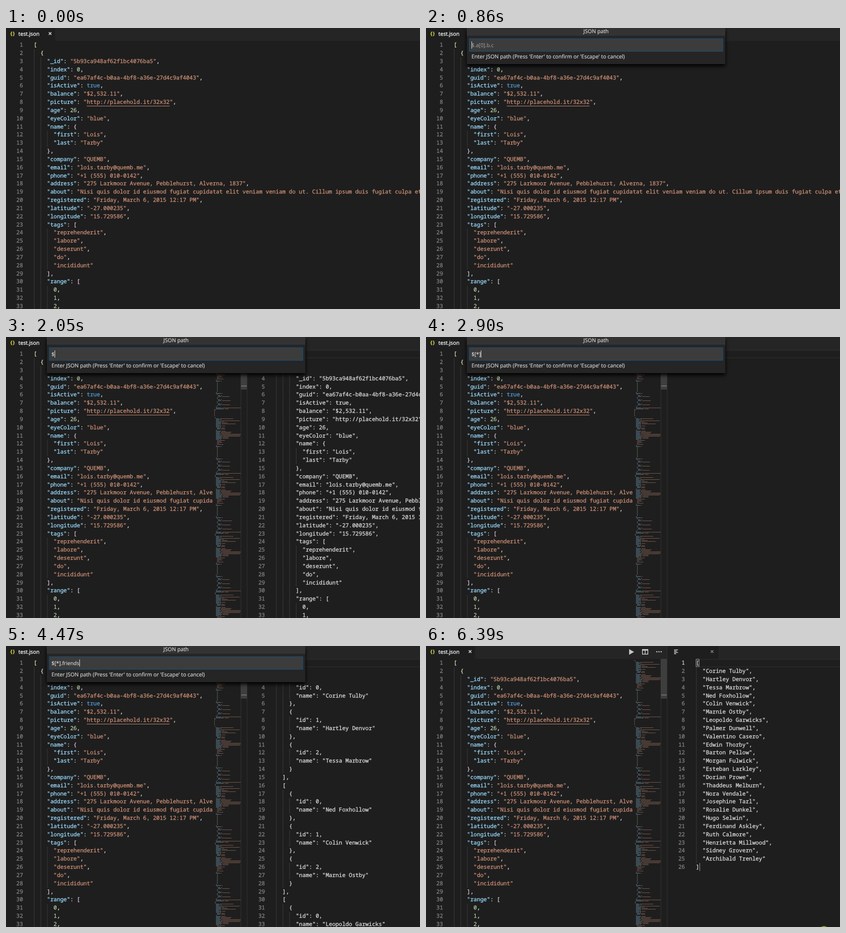
Recreate the animation shown at these times as an HTML page. Size 801 by 545 pixels, loop 6450 ms.

```html
<!DOCTYPE html>
<html lang="en">
<head>
<meta charset="utf-8">
<title>JSON path extraction</title>
<style>
  html, body { margin: 0; width: 100%; height: 100%; overflow: hidden; background: #1e1e1e; }
  body { position: relative; text-rendering: geometricPrecision; }
  svg { position: absolute; left: 0; top: 0; display: block; }
  .code { font: 10.69px "Noto Sans Mono", "DejaVu Sans Mono", monospace; color: #dedede; }
  .code text, .code tspan, .ui text { fill: currentColor; stroke: currentColor; stroke-width: .28; }
  .code .num { color: #858585; text-anchor: end; }
  .guide { stroke: #404040; stroke-width: .85; fill: none; }
  .ui, .box { font: 10.3px "Open Sans", "Noto Sans", sans-serif; }
  .box { position: absolute; left: 79px; top: 0; width: 500px; background: #252526; color: #d8d8d8;
    box-shadow: 0 4px 7px #000; white-space: nowrap; -webkit-text-stroke: .18px currentColor; }
  .input { position: absolute; left: 4px; width: 486px; height: 24px; padding-left: 4px; background: #3c3c3c;
    border: 1px solid #0f4c75; font-size: 10.1px; line-height: 24px; }
  .caret { display: inline-block; width: 1px; height: 14px; margin-right: -1px; vertical-align: -3px; background: #d8d8d8; }
  .row { position: absolute; left: 0; right: 0; height: 18.33px; line-height: 18.33px; padding: 0 15px 0 9px;
    display: flex; align-items: center; }
  .row.on { background: #062f4a; color: #fff; }
  .row.cut { border-top: 1px solid #3f3f46; margin-top: -1px; }
  .label { flex: 1; }
  .tag { color: #0e93ee; margin-left: 8px; }
  .key { font-size: 8.75px; line-height: 12px; min-width: 6px; padding: 0 3px; text-align: center;
    background: #353536; border: 1px solid #333; border-bottom-color: #444; border-radius: 2.5px; }
  .plus { font-size: 8.75px; margin: 0 2px; }
  .gap { width: 4px; }
  #title { height: 15px; line-height: 15px; background: #333334; text-align: center; }
  #hint { position: absolute; left: 9px; top: 47px; line-height: 18px; }
  #holder { color: #959595; }
</style>
</head>
<body>
<svg width="801" height="545" viewBox="0 0 801 545">
  <defs><clipPath id="pane"><rect id="paneRect" width="801" height="545"/></clipPath></defs>
  <rect width="801" height="545" fill="#1e1e1e"/>
  <rect x="95" width="706" height="25" fill="#252526"/>
  <g class="ui">
    <text x="8.5" y="14" font-size="9.5" font-weight="700" letter-spacing="1" color="#cbcb41">{}</text>
    <text x="24" y="14.8" color="#fff">test.json</text>
    <path d="M82.8 8.3l5 5m0-5l-5 5" stroke="#e0e0e0" stroke-width="1.5"/>
  </g>
  <g id="main" class="code" clip-path="url(#pane)"></g>
  <g id="split">
    <g id="minimap" fill="none" stroke-width="1" stroke-dasharray="1.2 .7"></g>
    <rect x="454" y="25" width="347" height="520" fill="#1e1e1e"/>
    <path d="M454.5 25V545" stroke="#303030"/>
    <rect x="454" y="25" width="12" height="77" fill="#3e3e3e"/>
    <path d="M455 95H466" stroke="#8c8c8c" stroke-width="1.1"/>
    <path d="M466.5 0V545" stroke="#303030"/>
    <rect x="467" width="99" height="25" fill="#1e1e1e"/>
    <g fill="#c5c5c5">
      <path d="M393 6l9.5 5.5l-9.5 5.5z"/>
      <path d="M418 6h12v10.5h-12zm1.5 3v6h3.8v-6zm5.3 0v6h3.7v-6z" fill-rule="evenodd"/>
      <path d="M445.5 10h2.2v2.2h-2.2zm4.2 0h2.2v2.2h-2.2zm4.2 0h2.2v2.2h-2.2z"/>
    </g>
    <path d="M480 7.5h7.5M480 10h5M480 12.5h7.5M480 15h4" stroke="#c5c5c5" stroke-width="1.3"/>
    <path d="M551 8.3l5 5m0-5l-5 5" stroke="#8a8a8a" stroke-width="1.3"/>
    <path d="M522 25.8H801M522 40.4H801" stroke="#2b2b2b" stroke-width="1.4"/>
    <g id="output" class="code"></g>
    <circle id="pointer" cx="770" cy="553" r="10" fill="#8d8a1c"/>
  </g>
</svg>

<div class="box" id="commands" style="height:288px">
  <div class="input" style="top:-3px">&gt;<span class="caret"></span></div>
</div>
<div class="box" id="prompt" style="height:70px">
  <div id="title">JSON path</div>
  <div class="input" style="top:20px"><span id="typed"></span><span class="caret" id="caret"></span><span id="holder">$.a[0].b.c</span></div>
  <div id="hint">Enter JSON path (Press 'Enter' to confirm or 'Escape' to cancel)</div>
</div>

<script>
const $ = id => document.getElementById(id);
const LOOP = 6450, CHAR = 6.414, LINE = 15.833, TOP = 25, ROWS = 33;

// Document and query results
const people = ['Corine Tulby', 'Hartley Denvor', 'Tessa Marbrow', 'Ned Foxhollow', 'Colin Venwick', 'Marnie Ostby',
  'Leopoldo Garwicks', 'Palmer Dunwell', 'Valentino Casero', 'Edwin Thorby', 'Barton Pellow', 'Morgan Fulwick',
  'Esteban Larkley', 'Dorian Prowe', 'Thaddeus Melburn', 'Nora Vendale', 'Josephine Tarl', 'Rosalie Dunkel',
  'Hugo Selwin', 'Ferdinand Askley', 'Ruth Calmore', 'Henrietta Millwood', 'Sidney Grovern', 'Archibald Trenley'];
const record = index => ({
  _id: '5b93ca948af62f1bc4076ba5',
  index,
  guid: 'ea67af4c-b0aa-4bf8-a36e-27d4c9af4043',
  isActive: true,
  balance: '$2,532.11',
  picture: 'http://placehold.it/32x32',
  age: 26,
  eyeColor: 'blue',
  name: { first: 'Lois', last: 'Tarby' },
  company: 'QUEMB',
  email: 'lois.tarby@quemb.me',
  phone: '+1 (555) 010-0142',
  address: '275 Larkmoor Avenue, Pebblehurst, Alverna, 1837',
  about: 'Nisi quis dolor id eiusmod fugiat cupidatat elit veniam veniam do ut. Cillum ipsum duis fugiat culpa et labore.',
  registered: 'Friday, March 6, 2015 12:17 PM',
  latitude: '-27.000235',
  longitude: '15.729586',
  tags: ['reprehenderit', 'labore', 'deserunt', 'do', 'incididunt'],
  range: [...Array(10).keys()],
  friends: people.slice(index * 3, index * 3 + 3).map((name, id) => ({ id, name })),
  greeting: 'Hello, Lois! You have 9 unread messages.',
  favoriteFruit: 'apple'
});
const data = [...Array(8).keys()].map(record);
const toLines = value => JSON.stringify(value, null, 2).split('\n');
const indentOf = line => line.search(/\S/);
const TOKEN = /"[^"]*"|true|\d+|[[\]{}]/g;

function colour(tok, next, indent) {
  if (tok[0] === '"') return next === ':' ? '#9cdcfe' : '#ce9178';
  if (tok === 'true') return '#569cd6';
  if (/\d/.test(tok)) return '#b5cea8';
  return indent < 4 ? '#ece3b8' : '#e0c8e0';
}

function paint(line) {
  const indent = indentOf(line);
  return line.trim().replace(TOKEN, (tok, at, all) =>
    `<tspan color="${colour(tok, all[at + tok.length], indent)}">${tok}</tspan>`);
}

const baseline = i => TOP + 11.2 + i * LINE;

function codeBlock(lines, x, format) {
  let guides = '', text = '';
  lines.slice(0, ROWS).forEach((line, i) => {
    const indent = indentOf(line);
    for (let k = 0; k < indent; k += 2) guides += `M${x + k * CHAR + .9} ${TOP + i * LINE}v${LINE}`;
    text += `<text x="${x + indent * CHAR}" y="${baseline(i)}">${format(line)}</text>`;
  });
  return `<path class="guide" d="${guides}"/>${text}`;
}

const numbers = (count, x) => [...Array(Math.min(count, ROWS)).keys()]
  .map(i => `<text class="num" x="${x}" y="${baseline(i)}">${i + 1}</text>`).join('');

const source = toLines(data);
$('main').innerHTML = numbers(ROWS, 32.8) + codeBlock(source, 53.6, paint) +
  `<path d="M156.2 151.4h${25 * CHAR}" stroke="#ce9178" stroke-width=".9"/>`;

// Minimap: one dashed stroke per token, grouped by colour
const strokes = {};
source.slice(0, 255).forEach((line, i) => {
  const y = 27.5 + i * 2 + (i > 57 ? 13 : 0);
  for (const m of line.matchAll(TOKEN)) {
    const x = 402.5 + m.index, c = colour(m[0], line[m.index + m[0].length], 4);
    if (x < 454) strokes[c] = (strokes[c] || '') + `M${x} ${y}H${Math.min(454, x + m[0].length)}`;
  }
});
$('minimap').innerHTML = Object.entries(strokes)
  .map(([c, d]) => `<path d="${d}" stroke="${c}" opacity=".75"/>`).join('') +
  '<path d="M403.5 140V154" stroke="#ce9178" opacity=".6"/>';

// Results: value, shown from, line numbers from, cleared at
const results = [
  [[data], 1880, 2050, 2210],
  [data, 2980, 3130, 3370],
  [data.map(d => d.friends), 4310, 4470, 4710],
  [people, 5400, 5550, LOOP]
].map(([value, from, numbered, to]) => {
  const lines = toLines(value), X = 522.2;
  const body = document.createElementNS('http://www.w3.org/2000/svg', 'g');
  const nums = body.cloneNode();
  body.innerHTML = codeBlock(lines, X, line => line.trim());
  nums.innerHTML = numbers(lines.length, 501);
  if (value === people) {
    body.innerHTML += '<path d="M522.5 25.5h6v14.5h-6zM529.7 421v15.5" fill="none" stroke="#999"/>';
    nums.firstChild.style.color = '#d0d0d0';
  }
  $('output').append(body, nums);
  return { body, nums, from, numbered, to };
});

// Command list
const commands = ['jsonpath: Extract JSON data||recently used', 'TSLint: Fix all auto-fixable problems',
  'Format Document|Shift Alt F', 'Run Code|Ctrl Alt N', 'Tasks: Run Build Task|Ctrl Shift B',
  'Python: Select Interpreter', 'Add Cursor Above|Ctrl Alt UpArrow|other commands',
  'Add Cursor Below|Ctrl Alt DownArrow', 'Add Cursors to Line Ends|Shift Alt I',
  'Add Line Comment|Ctrl K,Ctrl C', 'Add Selection To Next Find Match|Ctrl D',
  'Add Selection To Previous Find Match', 'Back|Alt LeftArrow', 'Change All Occurrences|Ctrl F2'];
const chord = keys => keys.split(' ').map(k => `<span class="key">${k}</span>`).join('<span class="plus">+</span>');
$('commands').innerHTML += commands.map((item, i) => {
  const [label, keys, tag] = item.split('|');
  return `<div class="row${i === 0 ? ' on' : i === 6 ? ' cut' : ''}" style="top:${27 + i * 18.33}px">` +
    `<span class="label">${label}</span>` +
    (keys ? keys.split(',').map(chord).join('<span class="gap"></span>') : '') +
    (tag ? `<span class="tag">${tag}</span>` : '') + '</div>';
}).join('');

// Timeline
const PATH = '$[*].friends..name';
const strikes = [1730, 2210, 2510, 2900, 3280, 3520, 3750, 3830, 3910, 3990, 4150, 4230, 4710, 4860, 5020, 5090, 5160, 5330];
const show = (el, on) => { el.style.display = on ? '' : 'none'; };
const within = (t, a, b) => t >= a && t < b;

function render(t) {
  const split = t >= 1805;
  show($('commands'), within(t, 230, 630));
  show($('prompt'), within(t, 760, 5920));
  show($('split'), split);
  $('paneRect').setAttribute('width', split ? 400 : 801);

  const typed = PATH.slice(0, strikes.filter(s => s <= t).length);
  if ($('typed').textContent !== typed) $('typed').textContent = typed;
  show($('holder'), !typed);
  $('caret').style.opacity = within(t, 1250, 1730) ? 0 : 1;

  for (const r of results) {
    show(r.body, within(t, r.from, r.to));
    show(r.nums, within(t, r.numbered, r.to));
  }
  show($('pointer'), t >= 6390);
}

const start = performance.now();
function tick() {
  render((performance.now() - start) % LOOP);
  requestAnimationFrame(tick);
}
tick();
</script>
</body>
</html>
```
